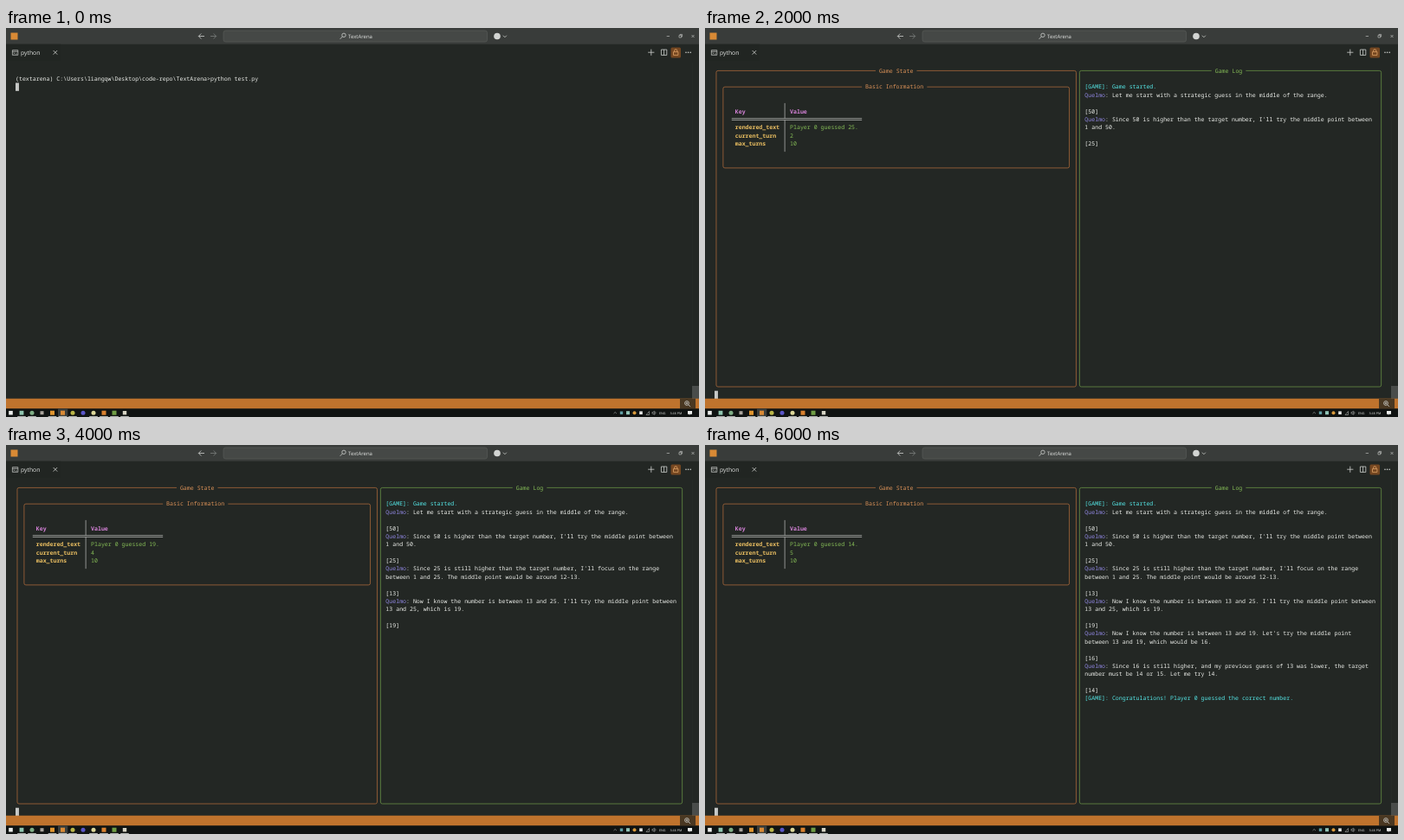
Recreate the animation shown at these times as an HTML page. Size 800x450 px, loop 7 s.

```html
<!DOCTYPE html>
<html lang="en">
<head>
<meta charset="utf-8">
<title>Terminal game</title>
<style>
html, body { margin: 0; width: 100%; height: 100%; overflow: hidden; background: #232724; }
svg { display: block; width: 800px; height: 450px; }
text { text-rendering: geometricPrecision; }
.ui { font-family: "Open Sans", "Noto Sans", sans-serif; fill: #e2e4e2; }
#term { font: 6.595px "Noto Sans Mono", "DejaVu Sans Mono", monospace; }
.bold { font-weight: 700; }
.medium { font-weight: 500; }
.line { fill: none; stroke: #cfd1cf; stroke-width: .8; }
.rule { fill: none; stroke: #c0c2c0; stroke-width: .7; }
</style>
</head>
<body>
<svg viewBox="0 0 800 450">
  <rect width="800" height="450" fill="#232724"/>

  <!-- title bar -->
  <rect width="800" height="18.7" fill="#393c3a"/>
  <rect x="5.5" y="5.5" width="8" height="8" fill="#d98a35"/>
  <rect x="251" y="3" width="304.5" height="13" rx="2.5" fill="#454846" stroke="#5b5e5c" stroke-width=".6"/>
  <text class="ui" x="395" y="11.8" font-size="6">TextArena</text>
  <g class="line">
    <path d="M229 9.5h-6.6m2.9-3l-3 3 3 3"/>
    <path d="M236 9.5h6.6m-2.9-3l3 3-3 3" stroke="#7c7f7d"/>
    <circle cx="390" cy="8.3" r="2.2"/><path d="M388.4 9.9l-2.7 2.9"/>
    <path d="M573.9 8.7l2 2 2-2"/>
    <path d="M762.7 9.5h3.3M777 8.4h2.6v2.6h-2.6zM778 8.2v-.8h2.6V10h-.8M791.5 8l3 3m0-3l-3 3" stroke-width=".6"/>
  </g>
  <circle cx="567" cy="9.5" r="3.8" fill="#d2d4d2"/>

  <!-- tab bar -->
  <rect y="18.7" width="63" height="19" fill="#212522"/>
  <text class="ui" x="17" y="31" font-size="6.85" fill="#fff">python</text>
  <rect x="767.5" y="22.5" width="11.5" height="12" rx="1.5" fill="#754721"/>
  <g class="line">
    <path d="M7.4 25.7h6.4v5.6H7.4zM7.4 27.3h6.4M8.8 28.6l1 .8-1 .8M11 30h1.6" stroke-width=".7"/>
    <path d="M54.6 26l4.6 4.6m0-4.6l-4.6 4.6"/>
    <path d="M741.2 28.2h7.2m-3.6-3.6v7.2M756.4 25h6.4v6.4h-6.4zM759.6 25v6.4"/>
    <path d="M770.5 27.6h5.4v3.8h-5.4zM771.6 27.6v-1.3a1.6 1.6 0 0 1 3.2 0v1.3" stroke="#e0a468"/>
  </g>
  <g fill="#d2d4d2"><circle cx="785" cy="28.3" r=".8"/><circle cx="787.6" cy="28.3" r=".8"/><circle cx="790.2" cy="28.3" r=".8"/></g>

  <g id="term"></g>

  <!-- scroll bar and status bar -->
  <path d="M792.2 40v374" stroke="#2b2f2c" stroke-width=".6"/>
  <rect x="792" y="414" width="8" height="15" fill="#494c4a"/>
  <rect y="428.7" width="800" height="11.8" fill="#bf732d"/>
  <rect x="778" y="428.7" width="18" height="11.8" fill="#4a3822"/>
  <g class="line"><circle cx="786" cy="434" r="2.4"/><path d="M787.8 435.8l2.2 2.3M784.8 434h2.4m-1.2-1.2v2.4"/></g>

  <!-- task bar -->
  <rect y="440.4" width="800" height="9.6" fill="#101312"/>
  <rect x="60" y="440.4" width="11.3" height="9.6" fill="#3b3e3c"/>
  <g id="apps"></g>
  <g class="line">
    <path d="M701.5 446l1.7-1.6 1.7 1.6M739 447.5l3.5-4v4zM746 444.5h1l1.4-1.2v4l-1.4-1.2h-1zM749.4 443.7q1.2 1.5 0 3" stroke-width=".5"/>
  </g>
  <path d="M787 443h5v3.8h-2.2l-1 1.2v-1.2H787z" fill="#eceeec"/>
  <text class="ui" x="754" y="446.9" font-size="3.7">ENG</text>
  <text class="ui" x="766.5" y="446.9" font-size="3.7">3:46 PM</text>
</svg>

<script>
const CELL = 3.957, ROW = 9.375, LEFT = 11, TOP = 49.4;
const ORANGE = '#dc9258', GREEN = '#86bd57', CYAN = '#55e8e8', VIOLET = '#8f86e0',
      PINK = '#d582d8', YELLOW = '#ecc062', WHITE = '#eceeea';
const ORANGE_EDGE = '#a8683a', GREEN_EDGE = '#668f45';
const BOT = 'Quelmo';

const colX = col => LEFT + col * CELL;
const midX = col => colX(col + .5);
const rowY = row => TOP + row * ROW;

const text = (col, row, str, color = WHITE, cls = '') =>
  `<text x="${colX(col)}" y="${rowY(row) + 2.3}" fill="${color}" class="${cls}">${str}</text>`;

const cursor = row =>
  `<rect x="${colX(0)}" y="${rowY(row) - 4.7}" width="${CELL}" height="${ROW}" fill="#c6c8c6"/>`;

// Rounded frame whose top edge leaves a gap for the title
function panel(left, right, top, bottom, title, titleCol, color, edge) {
  const x1 = midX(left), x2 = midX(right), y1 = rowY(top), y2 = rowY(bottom), r = 2;
  return `<path fill="none" stroke="${edge}" stroke-width=".8" d="M${colX(titleCol - 1)} ${y1}H${x1 + r}
    q${-r} 0 ${-r} ${r}V${y2 - r}q0 ${r} ${r} ${r}H${x2 - r}q${r} 0 ${r} ${-r}V${y1 + r}
    q0 ${-r} ${-r} ${-r}H${colX(titleCol + title.length + 1)}"/>` + text(titleCol, top, title, color);
}

const turns = [
  [50, 'Let me start with a strategic guess in the middle of the range.'],
  [25, "Since 50 is higher than the target number, I'll try the middle point between", '1 and 50.'],
  [13, "Since 25 is still higher than the target number, I'll focus on the range",
    'between 1 and 25. The middle point would be around 12-13.'],
  [19, "Now I know the number is between 13 and 25. I'll try the middle point between",
    '13 and 25, which is 19.'],
  [16, "Now I know the number is between 13 and 19. Let's try the middle point",
    'between 13 and 19, which would be 16.'],
  [14, 'Since 16 is still higher, and my previous guess of 13 was lower, the target',
    'number must be 14 or 15. Let me try 14.']
];

const LOG = 108;
const board =
  panel(0, 105, 0, 39, 'Game State', 48, ORANGE, ORANGE_EDGE) +
  panel(2, 103, 2, 12, 'Basic Information', 44, ORANGE, ORANGE_EDGE) +
  panel(106, 194, 0, 39, 'Game Log', 146, GREEN, GREEN_EDGE) +
  text(6, 5, 'Key', PINK, 'bold') + text(22, 5, 'Value', PINK, 'bold') +
  ['rendered_text', 'current_turn', 'max_turns'].map((key, i) => text(6, 7 + i, key, YELLOW, 'bold')).join('') +
  text(22, 9, '10', GREEN) +
  `<path class="rule" d="M${colX(5)} ${rowY(6) - 1}H${colX(43)}M${colX(5)} ${rowY(6) + .8}H${colX(43)}
    M${midX(20)} ${rowY(4)}V${rowY(6) - 1}M${midX(20)} ${rowY(6) + .8}V${rowY(10)}"/>` +
  text(LOG, 2, '[GAME]: Game started.', CYAN, 'medium') + cursor(40);

const screens = [
  text(0, 1, '(textarena) C:\\Users\\liangqw\\Desktop\\code-repo\\TextArena&gt;python test.py') + cursor(2)
];
let log = '', row = 3;
turns.forEach(([guess, first, ...rest], i) => {
  log += text(LOG, row++, `<tspan fill="${VIOLET}">${BOT}</tspan>: ${first}`);
  for (const line of rest) log += text(LOG, row++, line);
  log += text(LOG, ++row, `[${guess}]`);
  row++;
  if (i === turns.length - 1)
    log += text(LOG, row, '[GAME]: Congratulations! Player 0 guessed the correct number.', CYAN, 'medium');
  screens.push(board + log + text(22, 7, `Player 0 guessed ${guess}.`, GREEN) +
    text(22, 8, Math.min(i + 1, 5), GREEN));
});

// Task bar: x, colour, size, round, open
const icons = [
  [5.5, '#eceeec', 4.6], [18, '#8fc5b0', 4.8, 0, 1], [30, '#7fae86', 5, 1, 1], [41.5, '#a9a49c', 4],
  [53.5, '#e0952f', 5, 0, 1], [65.5, '#d98a35', 5, 0, 1], [77, '#b9b548', 5, 1, 1], [89, '#5a56c8', 5, 1],
  [101, '#dcd79a', 5, 1, 1], [113, '#d9812f', 5, 0, 1], [125, '#6f9d45', 5, 0, 1], [137, '#d5d3c4', 4.4, 0, 1],
  [710.5, '#5f9fa5', 3.4], [718, '#8fc3b5', 4], [725.5, '#d99a3c', 4, 1], [733, '#e4e6e4', 3.6]
];
document.getElementById('apps').innerHTML = icons.map(([x, color, size, round, open]) =>
  `<rect x="${x - size / 2}" y="${445.2 - size / 2}" width="${size}" height="${size}" rx="${round ? size / 2 : 0}" fill="${color}"/>` +
  (open ? `<rect x="${x - 4.8}" y="449.2" width="9.6" height=".8" fill="#d9dbd9"/>` : '')).join('');

const term = document.getElementById('term');
term.innerHTML = screens.map(screen => `<g>${screen}</g>`).join('');
const layers = [...term.children];

function draw() {
  const step = Math.floor(performance.now() % 7000 / 1000);
  layers.forEach((layer, i) => layer.style.display = i === step ? '' : 'none');
  requestAnimationFrame(draw);
}
draw();
</script>
</body>
</html>
```
